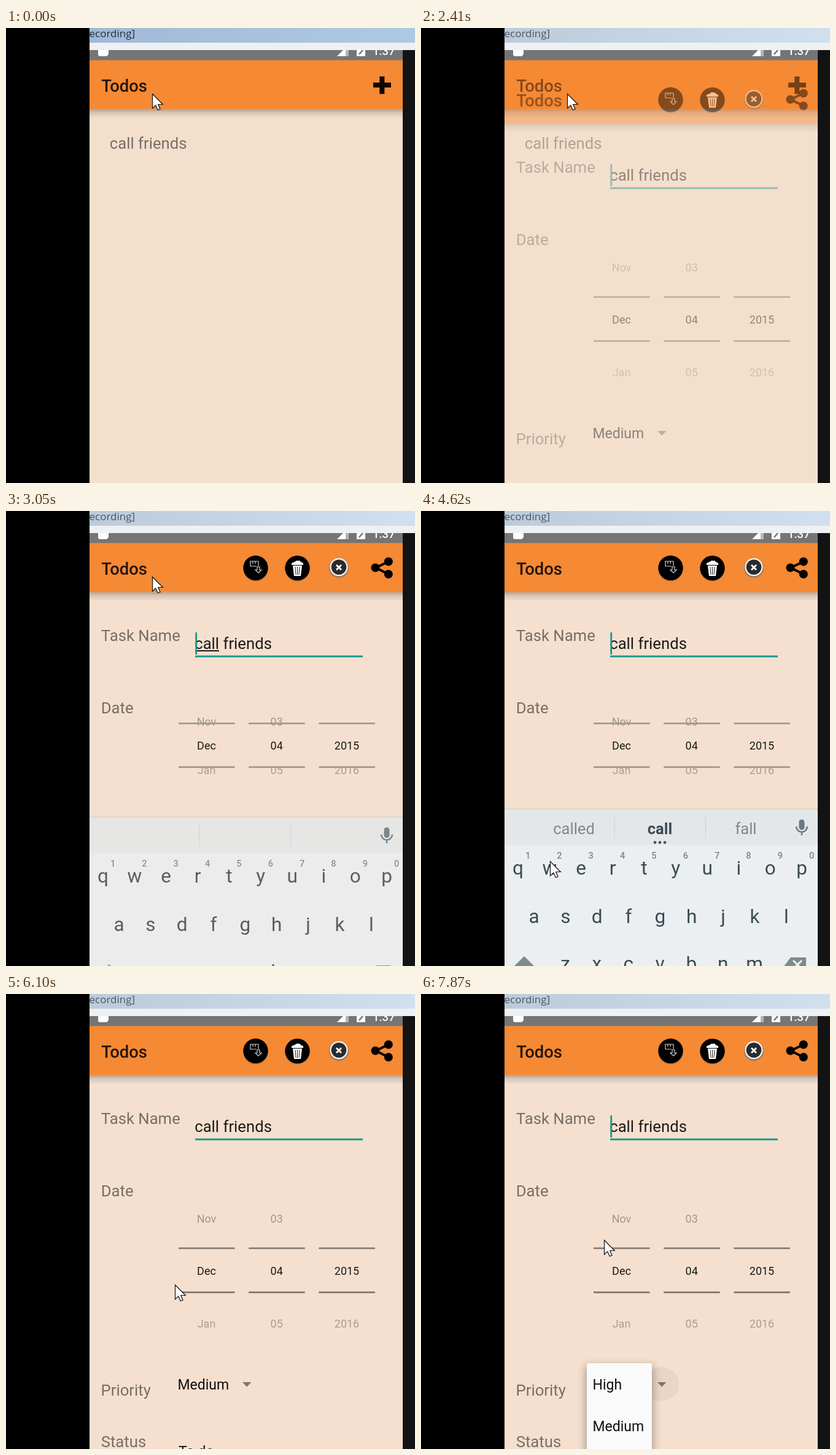
Recreate the animation shown at these times as an HTML page. Size 666 px wide and 742 px high, loop 8 s.

```html
<!DOCTYPE html>
<html lang="en">
<head>
<meta charset="utf-8">
<title>Todo app recording</title>
<style>
html, body { margin: 0; width: 100%; height: 100%; overflow: hidden; background: #000; }
svg { display: block; width: 666px; height: 742px; }
text { font-family: Roboto, "Noto Sans", sans-serif; white-space: pre; }
.label { font-size: 25.7px; fill: #786e66; }
.title { font-size: 27.4px; font-weight: 500; fill: #25150a; }
.spin { font-size: 23px; fill: #12100f; }
.pick { font-size: 18px; text-anchor: middle; }
.key { font-size: 31.5px; fill: #3c4b53; text-anchor: middle; }
.num { font-size: 14.5px; font-weight: 500; fill: #78858b; text-anchor: middle; }
.hint { font-size: 25.5px; fill: #7d888e; text-anchor: middle; }
</style>
</head>
<body>
<svg viewBox="0 0 666 742" xmlns="http://www.w3.org/2000/svg">
  <defs>
    <linearGradient id="active"><stop stop-color="#a0b9d7"/><stop offset="1" stop-color="#aec9e6"/></linearGradient>
    <linearGradient id="idle"><stop stop-color="#bccbda"/><stop offset="1" stop-color="#d0e0ef"/></linearGradient>
    <linearGradient id="drop" x2="0" y2="1">
      <stop stop-color="#000" stop-opacity=".3"/>
      <stop offset=".3" stop-color="#000" stop-opacity=".14"/>
      <stop offset="1" stop-color="#000" stop-opacity="0"/>
    </linearGradient>
    <clipPath id="screen"><rect x="136" y="52" width="510" height="690"/></clipPath>
    <clipPath id="status"><rect x="136" y="36" width="510" height="17"/></clipPath>
    <filter id="blur" x="-30%" y="-30%" width="160%" height="160%"><feGaussianBlur stdDeviation="7"/></filter>
    <g id="bar">
      <rect x="136" y="132.400" width="510" height="15" fill="url(#drop)"/>
      <rect x="136" y="52.500" width="510" height="79.900" fill="#f58934"/>
      <text class="title" x="155.300" y="103.500">Todos</text>
    </g>
  </defs>

  <rect width="666" height="742"/>
  <rect x="646" y="36" width="20" height="706" fill="#131313"/>
  <rect id="caption" x="136" width="530" height="24"/>
  <rect x="136" y="24" width="530" height="12" fill="#eff0f2"/>
  <text id="captionText" x="135.500" y="14.800" style="font:17px 'Open Sans','Noto Sans',sans-serif">ecording]</text>

  <g clip-path="url(#status)">
    <rect x="136" y="36" width="510" height="17" fill="#757575"/>
    <path d="M150 30H167V43L164 46H152L150 44Z" fill="#fff"/>
    <path d="M539 46L553 32V46Z" fill="#fff"/>
    <path d="M553 32H558V46H553Z" fill="#b5b5b5"/>
    <path d="M571 32H585V46H571Z" fill="#fff"/>
    <path d="M581 36L575 43" stroke="#757575" stroke-width="2.500"/>
    <text x="597" y="43.500" font-size="18.500" font-weight="500" fill="#fff">1:37</text>
  </g>

  <g clip-path="url(#screen)">
    <rect x="136" y="53" width="510" height="689" fill="#f4dfcd"/>
    <use href="#bar"/>
    <path d="M598 93H627M612.300 79V107.500" stroke="#0c0602" stroke-width="8"/>
    <text class="label" x="168.800" y="197">call friends</text>

    <g id="detail">
      <rect x="136" y="53" width="510" height="760" fill="#f5e0cf"/>
      <use href="#bar"/>
      <g id="icons">
        <circle cx="406.500" cy="94.500" r="20" fill="#9d6a40"/>
        <circle cx="406.500" cy="92.800" r="20.200"/>
        <path d="M397 82H411V90M398 82V90H408M402 82V86M406 82V86M409 91H413V96H416L411 101L406 96H409Z" fill="none" stroke="#d4d4d4" stroke-width="1.200"/>
        <circle cx="474.500" cy="94.500" r="20" fill="#9d6a40"/>
        <circle cx="474.500" cy="93" r="20.200"/>
        <path d="M465 88V85L470 83L473 81H478L480 83L484 85V88ZM467 89H482L480 106H469Z" fill="#fff"/>
        <path d="M471 91L472 104M474.500 91V104M478 91L477 104" stroke="#222" stroke-width="1"/>
        <circle cx="542" cy="93" r="16" fill="#9a7a62"/>
        <circle cx="542" cy="91.500" r="14.700" fill="#f3f0ed"/>
        <circle cx="542" cy="91.500" r="12.300" fill="#292b2d"/>
        <path d="M538 88L546 96M546 88L538 96" stroke="#fff" stroke-width="2.800"/>
        <path d="M622.800 82.500L602 92.500L622.800 103" fill="none" stroke="#000" stroke-width="4"/>
        <circle cx="622.800" cy="82.500" r="7"/><circle cx="601.500" cy="92.500" r="7"/><circle cx="622.800" cy="103" r="7"/>
      </g>
      <text class="label" x="154.800" y="211.500">Task Name</text>
      <text class="label" x="154.700" y="330">Date</text>
      <text class="label" x="307.200" y="225" style="fill:#1d1a18">call friends</text>
      <path id="spell" d="M308 228H347" stroke="#1d1a18" stroke-width="2"/>
      <rect x="308" y="235.600" width="273" height="3" fill="#18998b"/>
      <rect id="caret" x="308.300" y="198" width="2.800" height="36" fill="#18998b"/>
      <g id="picker"></g>
      <g id="lower">
        <circle id="ripple" cx="392" cy="636" r="28" fill="#ebd6c6"/>
        <text class="label" x="154.500" y="655">Priority</text>
        <text class="spin" x="279.500" y="644.500">Medium</text>
        <path d="M385 633H399.500L392.200 640.700Z" fill="#80756d"/>
        <text class="label" x="154.700" y="739">Status</text>
        <text class="spin" x="281" y="753.500">To do</text>
      </g>
    </g>

    <g id="popup">
      <rect x="268" y="606" width="110" height="220" fill="#000" opacity=".32" filter="url(#blur)"/>
      <rect x="270" y="602" width="106" height="220" rx="3" fill="#fafafa"/>
      <text class="spin" x="279.500" y="644.500">High</text>
      <text class="spin" x="279.500" y="713">Medium</text>
    </g>

    <g id="keyboard">
      <rect x="136" y="485" width="510" height="2" fill="#e3d3c6"/>
      <rect x="136" y="487" width="510" height="57.500" fill="#e4e7e9"/>
      <rect x="136" y="544.500" width="510" height="240" fill="#eceff1"/>
      <path d="M315 499V534M463.500 499V534" stroke="#cfd4d7" stroke-width="1.300"/>
      <g id="hints">
        <text class="hint" x="249" y="527">called</text>
        <text class="hint" x="389" y="527" style="font-weight:700;fill:#3c4b53">call</text>
        <text class="hint" x="529" y="527">fall</text>
        <g fill="#3c4b53"><circle cx="381" cy="540.500" r="2.300"/><circle cx="389" cy="540.500" r="2.300"/><circle cx="397" cy="540.500" r="2.300"/></g>
      </g>
      <rect x="615.500" y="503" width="9" height="17" rx="4.500" fill="#697981"/>
      <path d="M611 514.500A9 9 0 0 0 629 514.500M620 523V529" fill="none" stroke="#697981" stroke-width="2.500"/>
      <path d="M168 726L186 744V760H150V744Z" fill="#7d8a90"/>
      <path d="M602 728H627V760H602L592 741Z" fill="#7d8a90"/>
      <path d="M606 733L620 747M620 733L606 747" stroke="#eceff1" stroke-width="3"/>
    </g>

    <path id="mouse" d="M.500 .500V23.800L5.700 18.900L9.300 26.800L13 25.200L9.700 17.500H17.300Z" fill="#fff" stroke="#111" stroke-width="1.200"/>
  </g>
</svg>
<script>
const LOOP = 8000, TICK = 140;
const $ = id => document.getElementById(id);

function add(parent, tag, attrs, text = "") {
  const el = document.createElementNS("http://www.w3.org/2000/svg", tag);
  for (const k in attrs) el.setAttribute(k, attrs[k]);
  el.textContent = text;
  parent.append(el);
  return el;
}

// Date wheels: the outer rows and the rules move closer when space is short.
const rows = [[], [], []];
const rules = [];
[[326.5, "Nov", "Dec", "Jan"], [440.7, "03", "04", "05"], [555, "", "2015", "2016"]].forEach(([x, ...words]) => {
  words.forEach((word, i) =>
    rows[i].push(add($("picker"), "text", { class: "pick", x, fill: ["#a2968d", "#1b1816", "#a99d94"][i] }, word)));
  rules.push(add($("picker"), "path", { "stroke-width": 2.8 }));
});

function layoutPicker(tight) {
  const base = tight ? [349.5, 389, 428.5] : [372.5, 458, 543.5];
  const [top, bottom] = tight ? [346.3, 417.6] : [414.6, 486.5];
  rows.forEach((row, i) => row.forEach(el => el.setAttribute("y", base[i])));
  rules.forEach((el, i) => {
    const x = 281 + i * 114.2;
    el.setAttribute("d", `M${x} ${top}h91.500M${x} ${bottom}h91.500`);
    el.setAttribute("stroke", tight ? "#a5988e" : "#897e76");
  });
}

const PITCH = 51.35;
[["qwertyuiop", 158, 593], ["asdfghjkl", 184, 671.5], ["zxcvbnm", 235, 749]].forEach(([keys, x, y], r) =>
  [...keys].forEach((key, i) => {
    add($("keyboard"), "text", { class: "key", x: x + i * PITCH, y }, key);
    if (!r) add($("keyboard"), "text", { class: "num", x: 174 + i * PITCH, y: 566.5 }, (i + 1) % 10);
  }));

// Tracks are lists of [time, ...values].
const page = [[0, 0, 0], [2410, 24, .45], [2540, 5, .9], [2660, .8, 1], [2800, 0, 1]];
const board = [[0, 0, 0], [3050, 13, .86], [3190, 0, 1], [5060, 14, .6], [5210, 0, 0]];
const popup = [[0, 0], [7710, .5], [7870, 1]];
const blinks = [3190, 3590, 4110, 4620, 5060, 5650, 6100, 6660, 7150, 7710];
const path = [
  [0, 238, 107], [3060, 238, 107], [3220, 235, 193], [3640, 200, 400], [3920, 163, 530],
  [4340, 186, 576], [4620, 210, 571], [4900, 218, 735], [5040, 220, 780], [5180, 222, 780],
  [5600, 275, 474], [6580, 275, 474], [7000, 350, 620], [7280, 376, 645],
  [7560, 376, 645], [7840, 298, 401], [8000, 298, 401]
];

const hold = (track, t) => track.findLast(k => k[0] <= t).slice(1);

function glide(track, t) {
  const i = Math.max(1, track.findIndex(k => k[0] > t));
  const a = track[i - 1], b = track[i];
  const p = (t - a[0]) / (b[0] - a[0]);
  return [1, 2].map(n => a[n] + (b[n] - a[n]) * p);
}

const show = (id, on) => $(id).setAttribute("visibility", on ? "visible" : "hidden");

function place(id, x, y, alpha = 1) {
  $(id).setAttribute("transform", `translate(${x} ${y})`);
  $(id).setAttribute("opacity", alpha);
}

function draw(t) {
  const idle = t >= 1490;
  $("caption").setAttribute("fill", idle ? "url(#idle)" : "url(#active)");
  $("captionText").setAttribute("fill", idle ? "#4b5660" : "#26303a");

  place("detail", 0, ...hold(page, t));
  place("keyboard", 0, ...hold(board, t));
  show("hints", t >= 3190);
  show("spell", t >= 2930 && t < 3190);
  show("caret", blinks.filter(b => b <= t).length % 2 === 0);

  const tight = t >= 3050 && t < 5210;
  layoutPicker(tight);
  show("lower", !tight);
  show("ripple", t >= 7710);
  $("popup").setAttribute("opacity", hold(popup, t)[0]);

  place("mouse", ...glide(path, Math.floor(t / TICK) * TICK).map(Math.round));
}

const start = performance.now();
function frame(now) {
  draw(Math.max(0, now - start) % LOOP);
  requestAnimationFrame(frame);
}
draw(0);
requestAnimationFrame(frame);
</script>
</body>
</html>
```
